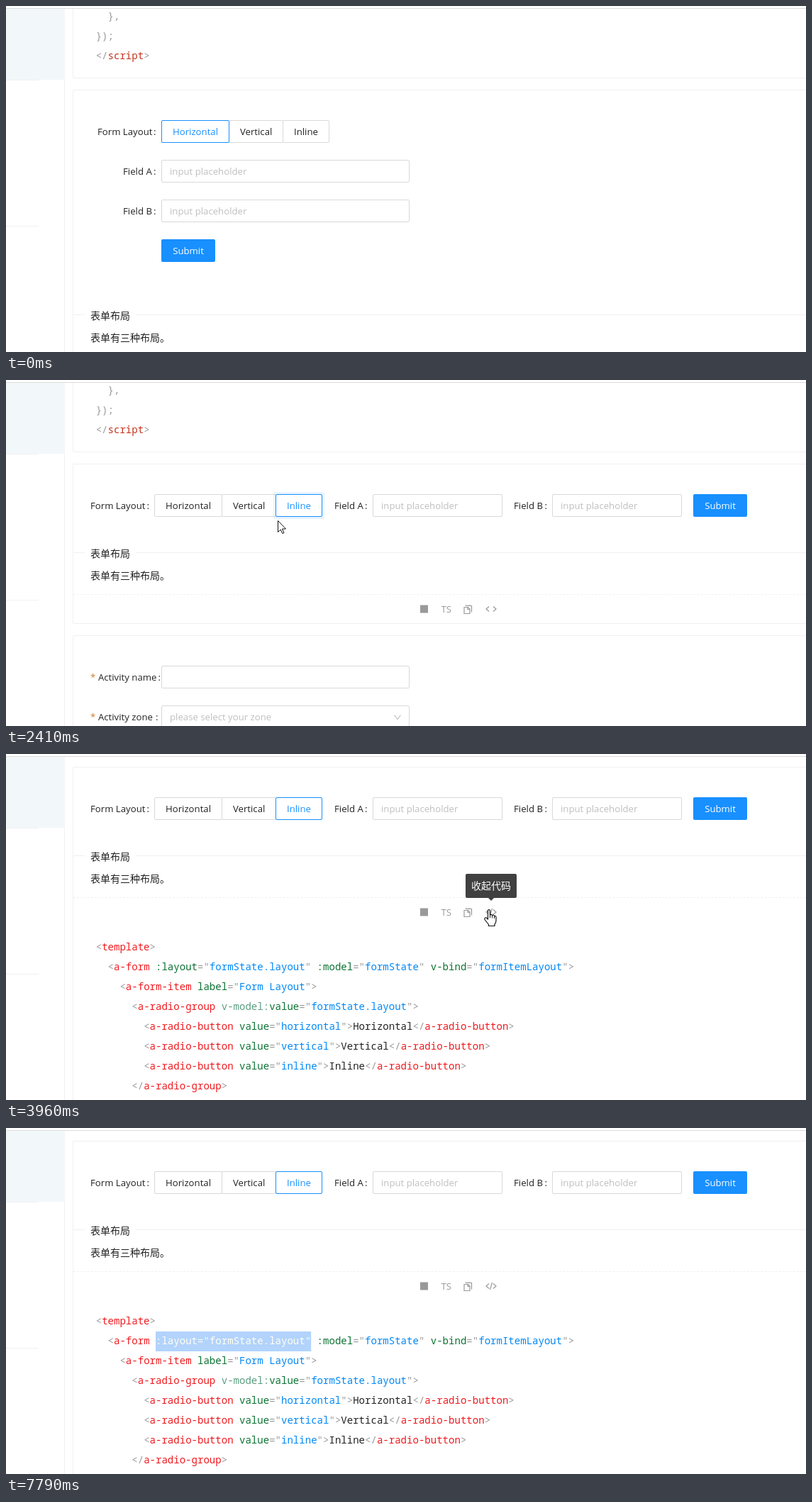
An HTML page that plays this animation: 1128 by 488 pixels, repeating every 8.79 s.

```html
<!DOCTYPE html>
<html lang="zh-CN">
<head>
<meta charset="utf-8">
<title>Form layout</title>
<style>
html, body { margin: 0; width: 100%; height: 100%; overflow: hidden; background: #fff; }
svg { display: block; width: 1128px; height: 488px; }
text { font: 13.2px "Open Sans", "Noto Sans CJK SC", "Noto Sans CJK", sans-serif; fill: #222; white-space: pre; }
.cjk { font: 14px "Noto Sans CJK SC", "Noto Sans CJK", sans-serif; }
.code { font: 14.05px "Noto Sans Mono", monospace; }
.hint { fill: #bfbfbf; }
.on { fill: #1890ff; }
.white { fill: #fff; }
.dim { fill: #999; }
.tag { fill: #f0191e; }
.attr { fill: #0b7232; }
.ns { fill: #5a9d80; }
.val { fill: #0088f5; }
.old { fill: #c5341f; }
.star { fill: #d07c36; }
.box { fill: #fff; stroke: #d9d9d9; }
.card { fill: #fff; stroke: #f0f0f0; }
.rule { stroke: #f0f0f0; fill: none; }
.icon { fill: none; stroke: #999; stroke-width: 1.2; }
.picked text, .picked tspan { fill: #fffef2; }
.cursor path { fill: #fff; stroke: #111; stroke-linejoin: round; }
</style>
</head>
<body>
<svg id="stage" viewBox="0 0 1128 488"></svg>
<script>
const STEP = 141.6, LOOP = 8790;
const CODE_X = 126.7, CHAR = 8.43, SEL_X = CODE_X + 10 * CHAR;

const text = (x, y, s, cls = '', extra = '') => `<text x="${x}" y="${y}" class="${cls}" ${extra}>${s}</text>`;
const rect = (x, y, w, h, cls, extra = '') =>
  `<rect x="${x + .5}" y="${y + .5}" width="${w - 1}" height="${h - 1}" rx="1.5" class="${cls}" ${extra}/>`;
const rule = (d, extra = '') => `<path d="${d}" class="rule" ${extra}/>`;
const group = (id, body, extra = '') => `<g id="${id}" ${extra}>${body}</g>`;
const label = (x, y, s, colonX) => text(x, y, s) + (colonX ? text(colonX, y, ':') : '');
const input = (x, y, w, hint = 'input placeholder') => rect(x, y, w, 32, 'box') + text(x + 12, y + 21, hint, 'hint');
const submit = (x, y) => `<rect x="${x}" y="${y}" width="76" height="32" rx="2" fill="#1890ff"/>` +
  text(x + 38, y + 21, 'Submit', 'white', 'text-anchor="middle"');

// Radio group: [left, width, text offset, caption]
const radios = [[0, 96, 16, 'Horizontal'], [95, 77, 111, 'Vertical'], [171, 66, 187, 'Inline']];
function radioGroup(id, x, y, active) {
  const [ax, aw] = radios[active];
  const ring = active ? `<rect id="${id}Ring" x="${x + ax - 3}" y="${y - 3}" width="${aw + 6}" height="38" rx="3" fill="#1890ff" opacity=".1"/>` : '';
  return radios.map(([dx, w]) => rect(x + dx, y, w, 32, 'box')).join('') + ring +
    rect(x + ax, y, aw, 32, 'box', 'style="stroke:#1890ff"') +
    radios.map(([, , tx, s], i) => text(x + tx, y + 21, s, i === active ? 'on' : '', `id="${id}${i}"`)).join('');
}

const title = y => rule(`M95 ${y + .5}H111M183 ${y + .5}H1128`) +
  text(119, y + 7, '表单布局', 'cjk') + text(119, y + 38, '表单有三种布局。', 'cjk');

// Small markup highlighter
const esc = s => s.replace(/</g, '&lt;').replace(/>/g, '&gt;');
const span = (cls, s) => `<tspan class="${cls}">${esc(s)}</tspan>`;
function highlight(line) {
  return line.replace(/(<\/?)([\w-]+)|(v-model:)?([\w:-]+)="([^"]*)"|>/g, (m, open, tag, ns, attr, val) => {
    if (open) return span('dim', open) + span('tag', tag);
    if (attr) return (ns ? span('ns', ns) : '') + span('attr', attr) + span('dim', '="') + span('val', val) + span('dim', '"');
    return span('dim', m);
  });
}
const codeLine = (s, i) => text(CODE_X, 259 + i * 28, highlight(s), 'code');
const source = [
  '<template>',
  '  <a-form :layout="formState.layout" :model="formState" v-bind="formItemLayout">',
  '    <a-form-item label="Form Layout">',
  '      <a-radio-group v-model:value="formState.layout">',
  '        <a-radio-button value="horizontal">Horizontal</a-radio-button>',
  '        <a-radio-button value="vertical">Vertical</a-radio-button>',
  '        <a-radio-button value="inline">Inline</a-radio-button>',
  '      </a-radio-group>',
];

// Everything below is placed relative to the top of the demo card.
const horizontal = rect(94, 0, 1100, 900, 'card') +
  label(129, 64, 'Form Layout', 208) + radioGroup('h', 219, 43, 0) +
  label(165, 120, 'Field A', 208) + input(219, 99, 350) +
  label(165, 176, 'Field B', 208) + input(219, 155, 350) +
  submit(219, 211) + title(317);

const vertical = rect(94, 0, 1100, 900, 'card') +
  label(119, 59, 'Form Layout') + radioGroup('v', 119, 73, 1) +
  label(119, 145, 'Field A') + input(119, 159, 1100) +
  label(119, 231, 'Field B') + input(119, 245, 1100) + submit(119, 301);

const inlineRow = label(119, 64, 'Form Layout', 198.5) + radioGroup('i', 209, 43, 2) +
  label(463, 64, 'Field A', 506) + input(517, 43, 183) +
  label(716, 64, 'Field B', 759.5) + input(770, 43, 183) +
  submit(969, 43) + title(125) +
  rule('M95 184.5H1128', 'stroke-dasharray="3 2"') +
  '<rect x="584" y="199.5" width="11" height="11" fill="#999"/>' +
  text(613.5, 210, 'TS', 'dim') +
  '<path class="icon" d="M648.5 200.5H656.5V209.5M646 202.5H651.5L654 205V211.5H646ZM648.5 200.5V199M653 199V200.5M651 203V205.5H654"/>' +
  '<path class="icon" stroke-width="1.4" d="M681 201.5L677 205 681 208.5M687 201.5L691 205 687 208.5"/>' +
  '<path id="slash" class="icon" d="M685.5 200L682.5 210"/>';

const required = (y, s, colonX) => text(119, y, '*', 'star') + label(130, y, s, colonX);
const nextCard = rect(94, 0, 1100, 226, 'card') + rect(94, 242, 1100, 900, 'card') +
  required(306, 'Activity name', 214.5) + input(219, 285, 350, '') +
  required(362, 'Activity zone', 211) + input(219, 341, 350, 'please select your zone') +
  required(418, 'Activity time', 208) + input(219, 397, 350, 'Pick a date') +
  '<path class="icon" style="stroke:#bfbfbf" d="M547.5 354.5L552 360.500 556.500 354.5M544.500 408.500H556.500V418.500H544.500ZM544.500 412H556.500M547.500 406.500V410M553.500 406.500V410"/>' +
  '<rect x="219" y="459" width="44" height="22" rx="11" fill="#bfbfbf"/><circle cx="230" cy="470" r="9" fill="#fff"/>';

const expanded = rect(94, 0, 1100, 900, 'card') + source.map(codeLine).join('') +
  '<rect id="sel" y="269" height="28" fill="#b2d3fc"/>' +
  group('picked', codeLine(source[1], 1), 'class="picked" clip-path="url(#selClip)"');

const tooltip = '<rect x="648" y="151" width="72" height="34" rx="2" fill="#404040"/>' +
  '<path d="M680 185H688L684 189Z" fill="#404040"/>' +
  text(684, 173, '', 'cjk white', 'id="tipText" text-anchor="middle" font-weight="500"');

const page = rect(94, -300, 1100, 284, 'card') +
  text(CODE_X + 2 * CHAR, -99, '},', 'code dim') + text(CODE_X, -71, '});', 'code dim') +
  text(CODE_X, -43, span('dim', '</') + span('old', 'script') + span('dim', '>'), 'code') +
  group('horizontal', horizontal) + group('vertical', vertical) +
  group('nextCard', nextCard) + group('expanded', expanded) +
  group('inline', inlineRow) + group('tip', tooltip);

const stage = document.getElementById('stage');
stage.innerHTML =
  '<defs><clipPath id="selClip"><rect id="selMask" y="269" height="28"/></clipPath></defs>' +
  group('page', page) +
  '<rect width="1128" height="3" fill="#fff"/><rect y="3" width="1128" height="1" fill="#dcdcdc"/>' +
  '<rect y="4" width="83" height="100" fill="#f2f7fa"/>' +
  rule('M82.5 104V488M0 104.500H46M0 310.500H46') +
  '<circle id="press" r="11.5" fill="#f6df2e" opacity=".72"/>' +
  group('arrow', '<path d="M.5 .5V16.500L4.200 13 6.800 18.500 9 17.500 6.500 12H11.500Z"/>', 'class="cursor"') +
  group('hand', '<path stroke-width="1.200" d="M-1.500 14V1.500Q0-.5 1.500 1.500V8Q3.500 6.500 4.500 8.500Q6.500 7.500 7.500 9.500Q10 9 10 11.500V16Q10 19 8 21V23.500H-.5V21.500L-6 14.500Q-6.500 11-3.500 12Z"/><path d="M1.500 8V12M4.500 9V12.500M7.500 10V13" stroke-width="1"/>', 'class="cursor"') +
  group('beam', '<path style="fill:none" d="M-3.500-7.500H-1L0-6.500 1-7.500H3.500M0-6.500V6.500M-3.500 7.500H-1L0 6.500 1 7.500H3.500"/>', 'class="cursor"');

// Pointer stops: [step, x, y, shape]
const path = [
  [1, 571, 302, 'arrow'], [3, 445, 222, 'arrow'], [4, 388, 190, 'arrow'], [5, 360, 172, 'hand'],
  [8, 360, 172, 'arrow'], [9, 383, 186, 'arrow'], [11, 315, 206, 'hand'], [15, 315, 206, 'arrow'],
  [17, 383, 198, 'arrow'], [20, 511, 177, 'arrow'], [22, 525, 183, 'arrow'], [25, 681, 219, 'hand'],
  [30, 681, 219, 'hand'], [31, 640, 226, 'arrow'], [33, 411, 238, 'arrow'], [34, 330, 262, 'beam'],
  [36, 222, 295, 'beam'], [37, 212, 297, 'beam'], [39, 212, 300, 'beam'], [45, 414, 304, 'beam'],
  [46, 421, 302, 'beam'], [47, 427, 302, 'beam'], [51, 427, 302, 'beam'], [54, 731, 412, 'beam'],
];
const $ = id => document.getElementById(id);
const show = (id, on) => { $(id).style.display = on ? '' : 'none'; };

function pointer(n) {
  let i = path.length - 1;
  while (i > 0 && path[i][0] > n) i--;
  const a = path[i], b = path[i + 1] || a;
  const k = b === a ? 0 : (n - a[0]) / (b[0] - a[0]);
  return { x: a[1] + (b[1] - a[1]) * k, y: a[2] + (b[2] - a[2]) * k, shape: a[3] };
}

function draw(t) {
  const n = Math.min(55, Math.floor(t / STEP + .08));
  const isInline = n >= 15, open = n >= 27;
  const top = n < 19 ? 118 : n < 20 ? 60 : n < 23 ? 24 : 18;
  $('page').setAttribute('transform', `translate(0 ${top})`);
  show('horizontal', n < 8);
  show('vertical', n >= 8 && !isInline);
  show('inline', isInline);
  show('nextCard', isInline && !open);
  show('expanded', open);
  show('slash', open);
  show('iRing', n < 26);
  show('tip', n >= 25 && n < 30);
  $('tipText').textContent = open ? '收起代码' : '显示代码';
  $('h1').classList.toggle('on', n >= 5);
  $('v2').classList.toggle('on', n >= 11);

  const p = pointer(n);
  for (const s of ['arrow', 'hand', 'beam']) {
    show(s, n > 0 && n < 55 && s === p.shape);
    $(s).setAttribute('transform', `translate(${Math.round(p.x)} ${Math.round(p.y)})`);
  }
  show('press', n === 7 || n === 13 || n === 14 || n === 26 || (n >= 39 && n < 50));
  $('press').setAttribute('cx', p.x - 1);
  $('press').setAttribute('cy', p.y);

  const end = n < 39 ? 0 : Math.min(26, Math.max(0, Math.round((p.x - SEL_X) / CHAR)));
  for (const id of ['sel', 'selMask']) {
    $(id).setAttribute('x', SEL_X);
    $(id).setAttribute('width', end * CHAR);
  }
}

const start = performance.now();
function tick() {
  draw((performance.now() - start) % LOOP);
  requestAnimationFrame(tick);
}
tick();
</script>
</body>
</html>
```
